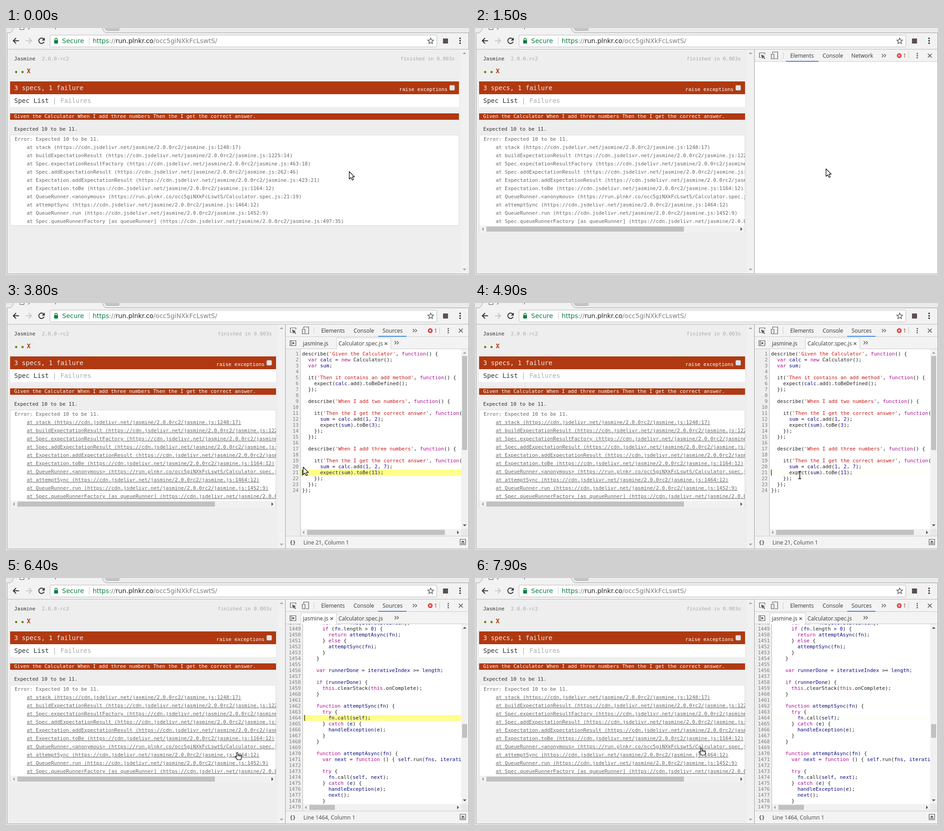
Animation, 1015 px wide and 541 px high, one loop 8000 ms. Source, as an HTML page:

```html
<!DOCTYPE html>
<html lang="en">
<head>
<meta charset="utf-8">
<title>Spec runner</title>
<style>
html, body { margin: 0; width: 100%; height: 100%; overflow: hidden; background: #eee; }
svg { display: block; }
text { white-space: pre; font: 11px "DejaVu Sans Mono", monospace; fill: #333; }
.big { font-size: 14px; }
.url { font: 14px "DejaVu Sans", sans-serif; }
.ui { font: 12px "Open Sans", sans-serif; }
.b { font-weight: bold; }
.link { text-decoration: underline; }
</style>
</head>
<body>
<svg id="stage" width="1015" height="541" viewBox="0 0 1015 541"></svg>
<script>
const LOOP = 8000, STEP = 100;
const RED = '#b03911', GREEN = '#0b8043', BAR = '#f3f3f3', LINE = '#ccc', BLUE = '#3879d9';

// drawing helpers
const rect = (x, y, w, h, fill, extra = '') =>
  `<rect x="${x}" y="${y}" width="${w}" height="${h}" fill="${fill}" ${extra}/>`;
const text = (x, y, s, fill = '#333', cls = '', extra = '') =>
  `<text x="${x}" y="${y}" class="${cls}" style="fill:${fill}" ${extra}>${s}</text>`;
const stroke = (d, color, w = 1, extra = '') =>
  `<path d="${d}" fill="none" stroke="${color}" stroke-width="${w}" ${extra}/>`;
const fill = (d, color) => `<path d="${d}" fill="${color}"/>`;
const circle = (x, y, r, color) => `<circle cx="${x}" cy="${y}" r="${r}" fill="${color}"/>`;
const span = (s, color) => `<tspan fill="${color}" style="fill:${color}">${s}</tspan>`;
const group = (id, s) => `<g id="${id}">${s}</g>`;
const clip = (x, y, w, h, s) =>
  `<svg x="${x}" y="${y}" width="${w}" height="${h}" viewBox="${x} ${y} ${w} ${h}" overflow="hidden">${s}</svg>`;
const tri = (x, y, dir, color, r = 4) => fill({
  up: `M${x - r} ${y + r / 2}h${2 * r}l${-r} ${-r}z`,
  down: `M${x - r} ${y - r / 2}h${2 * r}l${-r} ${r}z`,
  left: `M${x + r / 2} ${y - r}v${2 * r}l${-r} ${-r}z`,
  right: `M${x - r / 2} ${y - r}v${2 * r}l${r} ${-r}z`
}[dir], color);
const dots = (x, y, gap, r, color) => [-gap, 0, gap].map(d => circle(x, y + d, r, color)).join('');
const chevrons = (x, y) => stroke(`M${x} ${y - 3.5}l3.5 3.5l-3.5 3.5m5-7l3.5 3.5l-3.5 3.5`, '#555', 1.4);
const cross = (x, y, r, color, w) =>
  stroke(`M${x - r} ${y - r}l${2 * r} ${2 * r}m0 ${-2 * r}l${-2 * r} ${2 * r}`, color, w);

function browser() {
  return rect(0, 0, 1015, 541, '#ebebeb') + rect(3, 10, 1011, 528, '#eee') + rect(3, 11, 1011, 35, '#f2f2f2') +
    fill('M10 11Q14 9 17 0H211Q214 9 219 11z', '#f2f2f2') +
    stroke('M2.5 538V10.5H9Q13 9 17 0M211 0Q214 9 219 10.5H1015', '#a0a0a0') +
    fill('M217 0H247Q250 5 246 5H222Q219 5 217 0z', '#c6c6c6') + stroke('M217 0Q219 5.5 222 5.5H246Q250 5 247 0', '#a8a8a8') +
    stroke('M30.5 0V3.5H39.5V0', '#555') +
    text(48, 0, 'y', '#333', 'ui') + text(107, 0, 'p', '#333', 'ui') +
    stroke('M3 46.5H1014', '#b6b6b6') + stroke('M2 538.5H1015M1014.5 10V538', '#a0a0a0') +
    stroke('M28.5 28H16.5M22 22L16 28L22 34', '#333', 2) +
    stroke('M43.5 28H55.5M50 22L56 28L50 34', '#c8c8c8', 2) +
    stroke('M82.7 24.2A6 6 0 1 0 83.6 30', '#333', 2) + fill('M85 21V27.5H78.5z', '#333') +
    rect(96.5, 15.5, 848, 26, '#fff', 'rx="2" stroke="#b8b8b8"') +
    rect(105.5, 26.5, 8.5, 7.5, GREEN, 'rx="1"') + stroke('M107.3 27V25a2.5 2.5 0 0 1 5 0V27', GREEN, 1.4) +
    text(123, 33, 'Secure', GREEN, 'url') + stroke('M182.5 20V36', '#c4c4c4') +
    text(190, 33, span('https', GREEN) + span('://', '#808080') + span('run.plnkr.co', '#222') +
      span('/occ5giNXkFcLswtS/', '#808080'), '#222', 'url') +
    stroke('M931 22l1.8 4.2 4.5.4-3.4 3 1 4.4-3.9-2.3-3.9 2.3 1-4.4-3.4-3 4.5-.4z', '#555', 1.4) +
    rect(958, 23, 11, 11, '#5a4f4d') + dots(995.5, 28, 5.2, 1.8, '#333');
}

const CDN = 'https://cdn.jsdelivr.net/jasmine/2.0.0rc2/jasmine.js:';
const stack = [
  ['stack', CDN + '1248:17'],
  ['buildExpectationResult', CDN + '1225:14'],
  ['Spec.expectationResultFactory', CDN + '463:18'],
  ['Spec.addExpectationResult', CDN + '262:46'],
  ['Expectation.addExpectationResult', CDN + '423:21'],
  ['Expectation.toBe', CDN + '1164:12'],
  ['QueueRunner.&lt;anonymous>', 'https://run.plnkr.co/occ5giNXkFcLswtS/Calculator.spec.js:21:19'],
  ['attemptSync', CDN + '1464:12'],
  ['QueueRunner.run', CDN + '1452:9'],
  ['Spec.queueRunnerFactory [as queueRunner]', CDN + '497:35']
];

// the spec report, laid out for a given right edge
function report(right, narrow) {
  const w = right - 9, h = narrow ? 214 : 199;
  const rows = cls => stack.map(([f, at], i) => text(45.5, 265 + 18 * i, `at ${f} (${at})`, '#666', cls)).join('');
  const lines = narrow
    ? group('plain', rows('')) + group('linked', rows('link'))
    : rows('');
  return rect(3, 47, right + 19, 491, '#eee') +
    text(18, 71, 'Jasmine') + text(78.5, 71, '2.0.0-rc2', '#aaa') +
    text(right - 9, 71, 'finished in 0.003s', '#aaa', '', 'text-anchor="end"') +
    circle(22.3, 96.5, 2.4, '#5e7d00') + circle(36.3, 96.5, 2.4, '#5e7d00') +
    text(45.5, 99, 'X', RED, 'big b') +
    rect(9, 117, w, 28, RED) + text(18, 136, '3 specs, 1 failure', '#eee', 'big') +
    text(right - 25, 138, 'raise exceptions', '#fff', '', 'text-anchor="end"') +
    rect(right - 20.5, 125.5, 11, 11, '#e4e4e4', 'rx="2" stroke="#a9a9a9"') +
    rect(9, 145, w, 28, '#fff') + text(18, 164, 'Spec List ' + span('| Failures', '#aaa'), '#333', 'big') +
    rect(9, 187, w, 14, RED) +
    text(18, 197, 'Given the Calculator When I add three numbers Then the I get the correct answer.', '#fff') +
    text(18, 225, 'Expected 10 to be 11.') +
    rect(9.5, 234.5, w - 1, h - 1, '#fff', 'stroke="#ddd"') +
    text(19, 247, 'Error: Expected 10 to be 11.', '#666') +
    clip(10, 235, w - 1, 198, lines) +
    (narrow ? rect(10, 433, w - 2, 15, '#f1f1f1') + rect(25, 435, 433, 11, '#c1c1c1') +
      tri(17, 440.5, 'left', '#a3a3a3') + tri(584, 440.5, 'right', '#505050') : '') +
    rect(right + 4, 47, 16, 491, '#f1f1f1') +
    tri(right + 12, 55, 'up', '#a3a3a3') + tri(right + 12, 529, 'down', '#a3a3a3');
}

function devtoolsBar() {
  return rect(613, 47, 401, 491, '#fff') + rect(613, 47, 401, 26, BAR) +
    stroke('M612.5 47V538', '#a0a0a0') + stroke('M613 73.5H1014', LINE) +
    stroke('M627 64.5H623.5V54.5H635.5V58', '#5a5a5a', 1.2) + fill('M627 58L636 62L632.5 63L636 66.5L634.5 68L631 64.5L629.5 67.5z', '#5a5a5a') +
    stroke('M652.5 56V52.5H663.5V67.5H657M649.5 57.5H655.5V67.5H649.5z', '#5a5a5a', 1.2) +
    stroke('M675.5 53V68M950.5 53V68', LINE) +
    text(691, 65, 'Elements', '#333', 'ui') + text(762, 65, 'Console', '#333', 'ui') + chevrons(892, 60.5) +
    circle(930, 60.5, 5.2, '#dc3b36') + cross(930, 60.5, 2, '#fff', 1.3) + text(938.5, 65, '1', '#a33', 'ui') +
    dots(969.5, 60.5, 4.6, 1.5, '#555') + cross(997, 60.5, 4.3, '#555', 1.6);
}

const tabLine = (x, w) => rect(x, 72, w, 2, '#4287e6');
const P = '#a894a6', TAG = '#881280';
const open = (name, attrs = '') => span('&lt;', P) + span(name, TAG) + attrs + span('>', P);
const close = name => span('&lt;/', P) + span(name, TAG) + span('>', P);

function elementsPane() {
  const attr = ' ' + span('class', '#994500') + span('="', P) + span('html-reporter failure-list', '#1a1aa6') + span('"', P);
  return text(627, 87, '&lt;!DOCTYPE html PUBLIC "-//W3C//DTD HTML 4.01', '#c0c0c0') +
    text(627, 100, 'Transitional//EN" "http://www.w3.org/TR/html4/loose.dtd">', '#c0c0c0') +
    text(627, 114, open('html')) +
    tri(632, 125, 'right', '#6e6e6e') + text(638.5, 129, '#shadow-root (open)') +
    tri(632, 140, 'right', '#6e6e6e') + text(638.5, 144, open('head') + '…' + close('head')) +
    rect(613, 148, 401, 14, BLUE) + [617, 620.5, 624].map(x => circle(x, 157.5, 1, '#fff')).join('') +
    tri(632, 155, 'down', '#fff') +
    text(638.5, 159, '&lt;' + span('body', '#fff') + '> ' + '<tspan font-style="italic">== $0</tspan>', '#bcd3f5') +
    stroke('M632.5 163V192', '#b5cdf0') +
    tri(644.5, 170, 'right', '#6e6e6e') + text(650, 174, open('div', attr) + '…' + close('div')) +
    text(639, 189, close('body')) + text(627, 204, close('html')) +
    stroke('M613 460.5H1014M613 479.5H1014M613 506.5H1014', LINE) +
    text(620, 474, 'html', '#333', 'ui') + rect(652, 461, 41, 18, BLUE) + text(659, 474, 'body', '#fff', 'ui') +
    rect(613, 480, 401, 26, BAR) + rect(618.5, 482.5, 41, 24, '#fff', `stroke="${LINE}"`) +
    [[623, 'Styles'], [666, 'Computed'], [734, 'Event Listeners'], [828, 'DOM Breakpoints'], [935, 'Properties']]
      .map(([x, s]) => text(x, 499, s, '#444', 'ui')).join('') +
    text(617, 525, 'Filter', '#777', 'ui') + text(900, 524, ':hov', '#333', 'b') + text(937, 524, '.cls', '#333', 'b') +
    stroke('M977 520.5H987M982 515.5V525.5', '#555', 1.5) + fill('M990 524V528H986z', '#555') +
    rect(998, 507, 15, 31, '#f1f1f1') + tri(1005.5, 516, 'up', '#a3a3a3') + tri(1005.5, 529, 'down', '#505050');
}

const specCode = `describe('Given the Calculator', function() {
  var calc = new Calculator();
  var sum;

  it('Then it contains an add method', function() {
    expect(calc.add).toBeDefined();
  });

  describe('When I add two numbers', function() {

    it('Then the I get the correct answer', function() {
      sum = calc.add(1, 2);
      expect(sum).toBe(3);
    });
  });

  describe('When I add three numbers', function() {

    it('Then the I get the correct answer', function() {
      sum = calc.add(1, 2, 7);
      expect(sum).toBe(11);
    });
  });
});`;

const libCode = `      var fn = fns[iterativeIndex];
      if (fn.length > 0) {
        return attemptAsync(fn);
      } else {
        attemptSync(fn);
      }
    }

    var runnerDone = iterativeIndex >= length;

    if (runnerDone) {
      this.clearStack(this.onComplete);
    }

    function attemptSync(fn) {
      try {
        fn.call(self);
      } catch (e) {
        handleException(e);
      }
    }

    function attemptAsync(fn) {
      var next = function () { self.run(fns, iterativeIndex + 1); };

      try {
        fn.call(self, next);
      } catch (e) {
        handleException(e);
        next();
      }
`;

const TOKENS = new RegExp([
  "('[^']*')",
  '\\b(function|var|new|if|return|else|this|try|catch)\\b',
  '\\b(\\d+)\\b',
  '(\\.\\w+)',
  '\\b(calc|sum|fns?|iterativeIndex|attemptA?[sS]ync|runnerDone|length|self|e|next|handleException)\\b'
].join('|'), 'g');
const highlight = line => line.replace(TOKENS, (m, str, key, num, prop) =>
  prop ? m : span(m, str ? '#c41a16' : key ? '#aa0d91' : num ? '#1c00cf' : '#0a0a80'));

// o: first line number, row offset, gutter edge, marked row, active tab, scroll thumbs
function sourcesPane(id, src, o) {
  const g = o.gutter, base = i => 115 + 13 * (i + o.offset);
  const lines = src.split('\n');
  const nums = lines.map((_, i) => text(g - 3.5, base(i), o.first + i, '#808080', '', 'text-anchor="end"')).join('');
  const code = lines.map((s, i) => text(g + 4, base(i), highlight(s), '#222')).join('');
  const top = 105 + 13 * o.row;
  return rect(613, 74, 401, 27, BAR) + stroke('M613 100.5H1014', LINE) +
    stroke('M622.5 82.5H635.5V93.5H622.5zM625.5 82V94', '#5a5a5a', 1.2) + fill('M628 85L633 88L628 91z', '#5a5a5a') +
    rect(o.tab + .5, 76.5, o.tabW, 25, '#fff', `stroke="${LINE}"`) +
    text(651, 93, 'jasmine.js', '#333', 'ui') + text(729, 93, 'Calculator.spec.js', '#333', 'ui') +
    cross(o.tab + o.tabW - 10, 89, 2.8, '#555', 1.4) + chevrons(852, 87) +
    rect(613, 101, 401, 410, '#fff') + rect(613, 101, g - 613, 410, '#eee') + stroke(`M${g + .5} 101V510`, '#bbb') +
    clip(613, 101, g - 613, 410, nums) +
    rect(g + 1, top, 997 - g, 13, '#fff', `id="${id}Mark"`) +
    clip(g + 1, 101, 997 - g, 394, code) +
    rect(g + 4, top, 1.2, 13, '#000', `id="${id}Caret"`) +
    rect(998, 101, 16, 394, '#f1f1f1') + rect(1000, o.thumbY, 11, o.thumbH, '#c1c1c1') +
    tri(1005.5, 109, 'up', o.upArrow) + tri(1005.5, 487, 'down', '#505050') +
    rect(g + 1, 495, 997 - g, 15, '#f1f1f1') + rect(g + 15, 497, o.thumbW, 11, '#c1c1c1') +
    tri(g + 7, 502.5, 'left', '#a3a3a3') + tri(991, 502.5, 'right', '#505050') +
    rect(998, 495, 16, 15, '#e8e8e8') +
    rect(613, 510, 401, 28, BAR) + stroke('M613 510.5H1014', LINE) +
    text(622, 528, '{}', '#444', 'b') + text(652, 529, `Line ${o.first + o.row - o.offset}, Column 1`, '#444', 'ui') +
    stroke('M995.5 517.5H1007.5V529.5H995.5z', '#5a5a5a', 1.2) + fill('M997.5 524.5H1005.5L1001.5 520zM997.5 526H1005.5V527.5H997.5z', '#5a5a5a');
}

const HAND = 'M-.5 10V1.5a1.5 1.5 0 0 1 3 0V6.3a1.4 1.4 0 0 1 2.7.4a1.4 1.4 0 0 1 2.6.5a1.3 1.3 0 0 1 2.5.8V11.5L9 16H1.6L-4 9.8Q-4.2 7.8-2.3 8.3z';
const BEAM = 'M-3-8H-1L0-7L1-8H3M0-7V7M-3 8H-1L0 7L1 8H3';
const outlined = d => `<path d="${d}" fill="#fff" stroke="#000" stroke-width="1.2" stroke-linejoin="round"/>`;
const pointers =
  group('arrow', outlined('M.5 .5V17L4.3 13.4L7 19.2L9.8 18L7.2 12.2H12z')) +
  group('hand', outlined(HAND) + stroke('M2.5 6V9M5.2 7V9.5M7.8 7.5V10', '#000', .9)) +
  group('beam', stroke(BEAM, '#fff', 3) + stroke(BEAM, '#000', 1.4));

const $ = id => document.getElementById(id);
$('stage').innerHTML =
  browser() + group('wide', report(993, false)) +
  group('split', report(592, true) + devtoolsBar() +
    group('elements', tabLine(682, 71) + text(825, 65, 'Network', '#333', 'ui') + group('dom', elementsPane())) +
    group('sources', tabLine(816, 62) + text(825.5, 65, 'Sources', '#333', 'ui') +
      group('spec', sourcesPane('spec', specCode, {
        first: 1, offset: 0, gutter: 645, row: 20, tab: 724, tabW: 119,
        thumbY: 116, thumbH: 206, thumbW: 302, upArrow: '#a3a3a3'
      })) +
      group('lib', sourcesPane('lib', libCode, {
        first: 1448, offset: -1, gutter: 650, row: 15, tab: 646, tabW: 78,
        thumbY: 320, thumbH: 30, thumbW: 56, upArrow: '#505050'
      })))) +
  group('pointer', pointers);

// time, x, y, pointer shape from that time on
const path = [
  [0, 752, 314, 'arrow'], [300, 769, 308, 'arrow'], [1900, 769, 308, 'arrow'], [2100, 738, 319, 'arrow'],
  [2500, 606, 367, 'arrow'], [2600, 582, 372, 'hand'], [2800, 546, 368, 'hand'], [3200, 526, 371, 'hand'],
  [3400, 526, 371, 'hand'], [3600, 594, 364, 'arrow'], [3800, 651, 359, 'arrow'], [4000, 632, 347, 'arrow'],
  [4300, 579, 333, 'arrow'], [4600, 640, 358, 'arrow'], [4700, 664, 365, 'beam'], [4900, 712, 377, 'beam'],
  [5100, 800, 402, 'beam'], [5200, 815, 404, 'beam'], [5400, 700, 392, 'beam'], [5500, 640, 386, 'arrow'],
  [5600, 580, 384, 'hand'], [5800, 506, 382, 'hand'], [6900, 506, 382, 'hand'], [7300, 501, 414, 'hand'],
  [7500, 499, 412, 'hand'], [7800, 498, 380, 'hand'], [7900, 495, 372, 'hand'], [LOOP, 495, 372, 'hand']
];

const show = (id, on) => $(id).style.display = on ? '' : 'none';

function mark(id, age) {
  const p = Math.min(1, Math.max(0, age / 800));
  const eased = 1 - (1 - p) ** 2 * (1 + p * .9);
  $(id + 'Mark').setAttribute('fill', `rgb(255,255,${Math.round(120 + 130 * Math.min(1, eased))})`);
  show(id + 'Caret', age < 0 || age % 1000 < 500);
}

function render(now) {
  const t = Math.floor((now % LOOP) / STEP) * STEP;
  show('wide', t < 1500);
  show('split', t >= 1500);
  show('dom', t >= 1600);
  show('plain', t < 1700);
  show('linked', t >= 1700);
  show('elements', t < 3400);
  show('sources', t >= 3400);
  show('spec', t < 6100);
  show('lib', t >= 6100);
  mark('spec', t - 3700);
  mark('lib', t - 6300);

  const i = path.findIndex((_, k) => t < path[k + 1][0]);
  const [t0, x0, y0, shape] = path[i], [t1, x1, y1] = path[i + 1];
  const k = (t - t0) / (t1 - t0);
  const x = Math.round(x0 + (x1 - x0) * k), y = Math.round(y0 + (y1 - y0) * k);
  $('pointer').setAttribute('transform', `translate(${x} ${y})`);
  for (const name of ['arrow', 'hand', 'beam']) show(name, name === shape);
}

const start = performance.now();
function tick() {
  render(performance.now() - start);
  requestAnimationFrame(tick);
}
tick();
</script>
</body>
</html>
```
